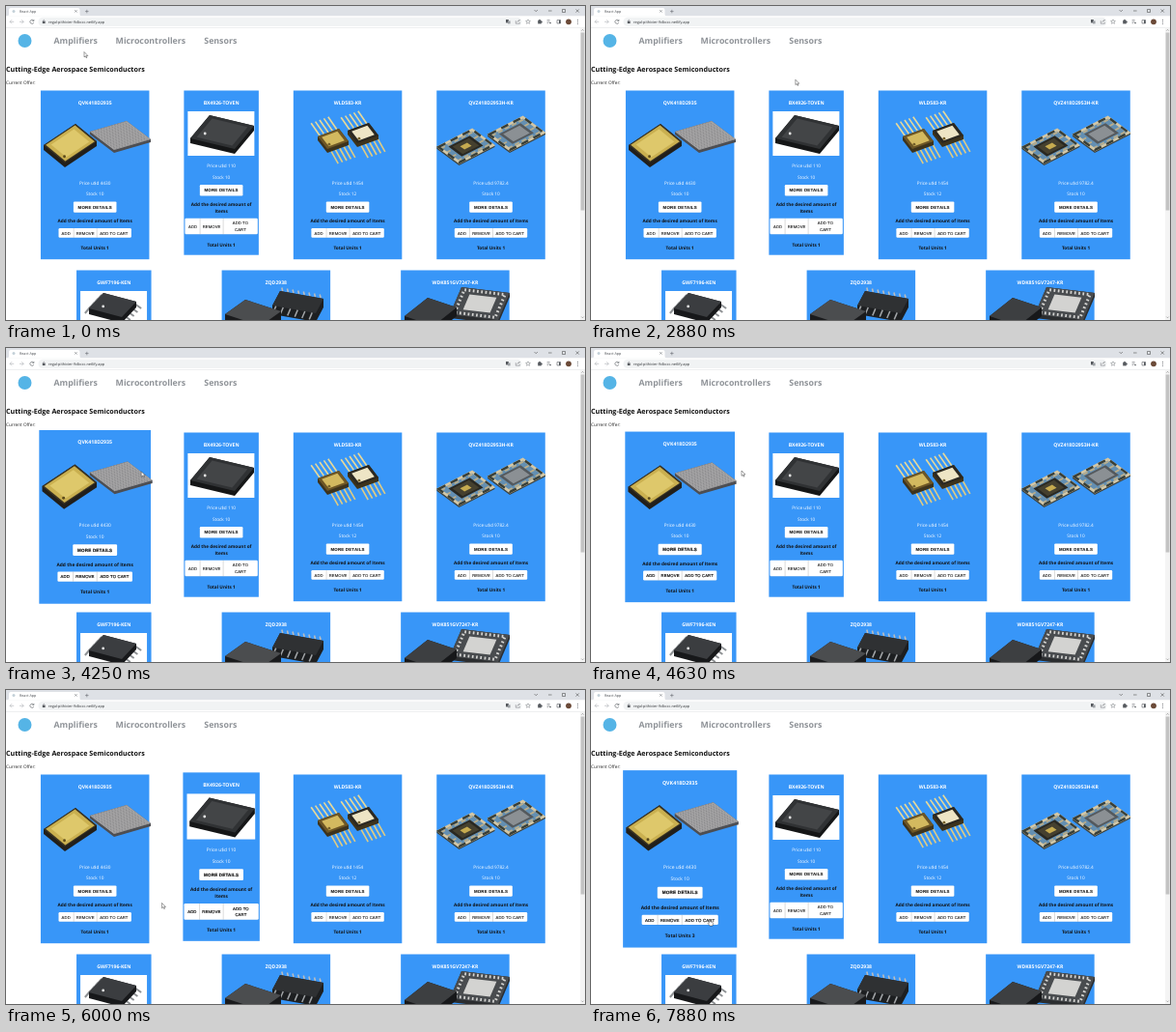
An HTML page that plays this animation: 600 by 325 pixels, repeating every 8000 ms.

```html
<!DOCTYPE html>
<html lang="en">
<head>
<meta charset="utf-8">
<title>React App</title>
<style>
html, body { margin: 0; width: 100%; height: 100%; overflow: hidden; background: #fff; }
svg { display: block; width: 600px; height: 325px; }
text { font-family: "Open Sans", "Noto Sans", sans-serif; text-rendering: geometricPrecision; white-space: pre; }
.b { font-weight: 700; }
.m { text-anchor: middle; }
.u { font-family: "Liberation Sans", Arial, sans-serif; letter-spacing: .1px; stroke: #111; stroke-width: .07px; }
.hover .u { stroke-width: .16px; }
</style>
</head>
<body>
<svg id="stage" viewBox="0 0 600 325" xmlns="http://www.w3.org/2000/svg"></svg>
<script>
const LOOP = 8000, STEP = 125, GROW = 250, ZOOM = 1.05;
const BLUE = '#3896f8', INK = '#55595e';

const rect = (x, y, w, h, fill, more = '') => `<rect x="${x}" y="${y}" width="${w}" height="${h}" fill="${fill}" ${more}/>`;
const dot = (x, y, r, fill) => `<circle cx="${x}" cy="${y}" r="${r}" fill="${fill}"/>`;
const line = (d, color, w, more = '') => `<path d="${d}" fill="none" stroke="${color}" stroke-width="${w}" ${more}/>`;
const text = (x, y, s, size, fill, cls = '', more = '') =>
  `<text x="${x}" y="${y}" font-size="${size}" fill="${fill}" class="${cls}" ${more}>${s}</text>`;
const times = (n, f) => Array.from({ length: n }, (_, i) => f(i)).join('');

// Chips are parallelograms: corner o, edges a and b
const at = ([o, a, b], u, v) => [o[0] + a[0] * u + b[0] * v, o[1] + a[1] * u + b[1] * v];
const ring = (q, m) => [[m, m], [1 - m, m], [1 - m, 1 - m], [m, 1 - m]].map(c => at(q, ...c)).join(' ');
const face = (q, m, fill, more = '') => `<polygon points="${ring(q, m)}" fill="${fill}" ${more}/>`;
const trim = (q, m, color, w, dash) => face(q, m, 'none', `stroke="${color}" stroke-width="${w}" stroke-dasharray="${dash}"`);
const stripes = (q, n, color, w, dash) => times(n, i =>
  line(`M${at(q, .03, (i + .5) / n)}L${at(q, .97, (i + .5) / n)}`, color, w, `stroke-dasharray="${dash}"`));
const pins = (q, n, v, dx, dy, color, w) => times(n, i => line(`M${at(q, (i + .5) / n, v)}l${dx} ${dy}`, color, w));
const mark = (q, u, v, fill) => dot(...at(q, u, v), 1.4, fill);

function slab(q, h, top, side) {
  const down = ([x, y]) => [x, y + h];
  const [p0, p1, p2, p3] = [at(q, 0, 0), at(q, 1, 0), at(q, 1, 1), at(q, 0, 1)];
  const hull = [p0, p1, p2, down(p2), down(p3), down(p0)].join(' ');
  return `<polygon points="${hull}" fill="${side}"/>` + face(q, 0, top);
}

function goldPic() {
  const balls = [[87, 130], [38, -11], [25, 19]], chip = [[39, 144], [33, -22], [22, 18]];
  return slab(balls, 3, '#a9a8a9', '#4d4e52') + stripes(balls, 17, '#68686b', .6, '.8 .8')
    + slab(chip, 5, '#3a3323', '#211f1b') + face(chip, .04, '#cab050') + face(chip, .14, '#dec86b')
    + mark(chip, .12, .8, '#5c4a1b');
}
function bgaPic(x, y) {
  const chip = [[191, 137], [20, -24], [46, 11]];
  return rect(x + 4, y + 21.5, 69, 46, '#fff') + slab(chip, 5, '#303234', '#151617')
    + face(chip, .1, '#434547') + mark(chip, .3, .2, '#e6e6e6');
}
function leadPic() {
  const one = (x, y, lid, core) => {
    const q = [[x, y], [22, -8], [10, 13]];
    return pins(q, 5, 0, -9, -13, '#e8d998', 1.6) + pins(q, 5, 1, 9, 16, '#dfcc83', 1.6)
      + slab(q, 4, lid, '#3d331c') + face(q, .13, core) + mark(q, .2, .75, '#75602a');
  };
  return one(354, 129, '#2b2821', '#eee5c5') + one(323, 135, '#6d5626', '#d3b95f');
}
function framePic() {
  const one = (x, y, rim, die) => {
    const q = [[x, y], [37, -19], [23, 17]];
    return slab(q, 2, '#638fb2', '#3f443f') + stripes(q, 4, '#b9ad8b', 1.8, '5 3')
      + trim(q, .03, '#d3c7a6', 2.6, 'none') + trim(q, .03, '#383e37', 2.4, '8 6')
      + face(q, .2, rim) + face(q, .27, die);
  };
  const left = [446.5, 146];
  return one(499, 133, '#54595d', '#8b9094') + one(...left, '#292822', '#45402f')
    + face([left, [37, -19], [23, 17]], .4, '#c6ab50');
}
function soicPic(x, y) {
  const chip = [[86, 313], [15, -16], [34, 9]];
  return rect(x + 4, y + 21.5, 69, 32, '#fff') + pins(chip, 4, 0, -6, 7, '#8d9093', 2)
    + pins(chip, 4, 1, 7, 5, '#8d9093', 2) + slab(chip, 6, '#3b3d40', '#17181a') + mark(chip, .3, .3, '#e4e4e4');
}
function quadPic() {
  const back = [[276, 310], [8, -15], [45, 8]], front = [[227, 319], [21, -15], [37, 12]];
  const edge = [at(back, 1, 0), back[2], [0, 0]], near = [back[0], back[2], [0, 0]];
  return pins(edge, 8, 0, -1, -4, '#b9bcbf', 1.5) + slab(back, 9, '#2f3133', '#1d1f21')
    + pins(near, 6, 0, -3, 7, '#a2a5a8', 1.5) + slab(front, 9, '#4b4d4f', '#1a1b1d');
}
function qfnPic() {
  const pads = [[460, 319], [12, -28], [50, 6]], front = [[413, 321], [24, -19], [30, 10]];
  return slab(pads, 4, '#494c4f', '#2b2d2f') + trim(pads, .08, '#d4d4d2', 3, '1.7 2.6')
    + face(pads, .22, '#d3d3d1') + slab(front, 9, '#3d3f41', '#17181a');
}

const cards = [];
function row(y, h, ...items) {
  const room = 594.7 - items.reduce((s, i) => s + i.w, 0);
  const gap = room / (items.length + 1);
  let x = gap;
  return items.map(i => {
    const c = { id: i.pic.name, x, y, h, ...i };
    cards.push(c);
    x += i.w + gap;
    return cardSvg(c);
  }).join('');
}

const pill = (x, y, w, h) => rect(x, y + .3, w, h, '#2a72c0', 'rx="1.3" opacity=".35"') + rect(x, y, w, h, '#fff', 'rx="1.2"');

function cardSvg({ id, x, y, w, h, name, pic, price, stock }) {
  const c = x + w / 2, wide = w > 100, o = wide ? 0 : -17.4;
  const mid = (dy, s, cls = 'b m', fill = '#111') => text(c, y + dy, s, 4.72, fill, cls);
  const btn = (dx, dy, s) => text(c + dx, y + dy, s, 4.2, '#111', 'u m');
  const bar = bh => pill(c - 37.7, y + (wide ? 142.5 : 132.3), 75.4, bh)
    + line(`M${c - 22} ${y + (wide ? 142.5 : 132.3)}v${bh}m24 0v${-bh}`, '#999', .35);
  let out = rect(x, y, w, h, BLUE) + text(c, y + 14.1, name, 5.1, '#fff', 'b m') + pic(x, y);
  if (price) {
    out += mid(97.1 + o, 'Price u$d ' + price, 'm', '#fff') + mid(108.5 + o, 'Stock ' + stock, 'm', '#fff')
      + pill(c - 22.3, y + 114.9 + o, 44.6, 11.4)
      + text(c, y + 122.2 + o, 'MORE DETAILS', 4.4, '#111', 'u b m', 'style="letter-spacing:.2px"')
      + (wide
        ? mid(136.6, 'Add the desired amount of Items') + bar(9.8)
          + btn(-30, 149, 'ADD') + btn(-10, 149, 'REMOVE') + btn(19.7, 149, 'ADD TO CART')
        : mid(119.2, 'Add the desired amount of') + mid(126.1, 'Items') + bar(16.4)
          + btn(-29.5, 142, 'ADD') + btn(-10, 142, 'REMOVE') + btn(19.8, 138.8, 'ADD TO') + btn(19.8, 145.4, 'CART'))
      + `<g id="${id}Units">${mid(wide ? 164.6 : 161, 'Total Units 1')}</g>`;
  }
  return `<g id="${id}">${out}</g>`;
}

function browser() {
  const pale = '#a9adb0';
  return rect(0, 0, 600, 10.5, '#dee1e6')
    + '<path d="M1 10.5Q3 10.5 3 8.5V4Q3 2 5 2H74.5Q76.5 2 76.5 4V8.5Q76.5 10.5 78.5 10.5Z" fill="#fff"/>'
    + dot(8, 5.6, 1.5, '#c3d0d8') + text(14, 7, 'React App', 3.7, '#45494d')
    + line('M71.2 4.2l2.4 2.4m0-2.4l-2.4 2.4M82 5.6h3.6M83.8 3.8v3.6', INK, .5)
    + line('M547.5 4l1.7 1.7 1.7-1.7M562 5h3.6M576.5 3.5h3v3h-3zM590.6 3.4l3.2 3.2m0-3.2l-3.2 3.2', '#333', .5)
    + rect(0, 10.5, 600, 12, '#fff') + rect(33.5, 11.7, 501, 9.3, '#f1f3f4', 'rx="4.6"')
    + line('M8.2 16.3H4m2-2l-2 2 2 2M14 16.3h4.2m-2-2l2 2-2 2', pale, .6)
    + line('M28.6 15.2a2 2 0 1 0 .2 1.8M28.9 13.9v1.6h-1.6', INK, .6)
    + rect(37.8, 15.8, 2.8, 2.3, INK) + line('M38.4 16v-1q.8-1.4 1.6 0v1', INK, .45)
    + text(44, 17.8, 'regal-pithivier-9dbccc.netlify.app', 3.85, '#303336')
    + rect(518, 14, 2.8, 3.4, INK) + rect(520, 15.4, 2.6, 3, '#9b9fa3')
    + line('M528.3 15.2v3h4v-1.4M529.8 16.8q.4-2 2.6-2l-.8-.9m.8.9l-.8.8', INK, .45)
    + line('M541 13.8l.7 1.6 1.7.1-1.3 1.1.4 1.7-1.5-.9-1.5.9.4-1.7-1.3-1.1 1.7-.1z', INK, .4)
    + rect(551.2, 14.8, 3.6, 3.6, INK) + dot(553, 14.5, .8, INK) + dot(555.1, 16.6, .8, INK)
    + line('M560.6 14.6h3M560.6 16.2h3M560.6 17.8h1.6', INK, .5) + dot(564, 17.6, .8, INK)
    + line('M571 14.6h3.6v3.4H571z', INK, .6) + rect(573, 14.6, 1.6, 3.4, INK)
    + dot(583, 16.3, 2.9, '#6b4a38')
    + times(3, i => dot(592.5, 14.4 + 1.9 * i, .5, INK))
    + rect(0, 22, 600, .5, '#dcdee1')
    + rect(595, 22.5, 5, 302.5, '#f4f4f4') + rect(595.6, 27.5, 3.8, 184, '#c3c3c3')
    + line('M596.3 25.6l1.2-1.2 1.2 1.2M596.3 321.6l1.2 1.2 1.2-1.2', '#777', .6);
}

function page() {
  const nav = (x, s) => text(x, 38.6, s, 8.8, '#8f9398', 'b');
  const wide = 112.5, slim = 77.5;
  return rect(0, 0, 600, 325, '#fff') + dot(19.5, 36, 7, '#55b4e6')
    + nav(49.5, 'Amplifiers') + nav(113.6, 'Microcontrollers') + nav(205.3, 'Sensors')
    + text(0, 67.7, 'Cutting-Edge Aerospace Semiconductors', 7.16, '#111', 'b')
    + text(0, 81, 'Current Offer:', 4.7, '#222')
    + row(87.5, 174.7,
      { w: wide, name: 'QVK418D2935', pic: goldPic, price: '4430', stock: 10 },
      { w: slim, h: 170.2, name: 'BX4926-TOVEN', pic: bgaPic, price: '110', stock: 10 },
      { w: wide, name: 'WLD583-KR', pic: leadPic, price: '1454', stock: 12 },
      { w: wide, name: 'QVZ418D2953H-KR', pic: framePic, price: '9782.4', stock: 10 })
    + row(273.5, 60,
      { w: slim, name: 'GWF7196-KEN', pic: soicPic },
      { w: wide, name: 'ZQD2938', pic: quadPic },
      { w: wide, name: 'WDK851GV7247-KR', pic: qfnPic });
}

const shapes = {
  arrow: 'M0 0V5.4L1.3 4.3 2.2 6.2 3 5.8 2.2 4H3.9Z',
  beam: 'M-1 -2.6H1M0 -2.6V2.6M-1 2.6H1',
  hand: 'M-.6 .3Q0 -.5 .6 .3V2.4L3 2.9Q3.8 3.2 3.6 4.2L3 6.6H.1L-1.9 4Q-1.9 3 -.6 3.8Z'
};

const $ = id => document.getElementById(id);
$('stage').innerHTML = page() + browser() + '<path id="pointer" fill="#fff" stroke="#111" stroke-width=".4"/>';

// Pointer stops: time, x, y
const stops = [
  [0, 81, 47.5], [1125, 104.5, 65.5], [1700, 70, 66], [2600, 150, 73], [3200, 285, 80],
  [3550, 269, 136], [3750, 254.5, 141.3], [4150, 136, 128], [4625, 156, 127], [5100, 110, 178],
  [5625, 191.5, 210], [5800, 198, 214], [6500, 70.5, 236.5], [6750, 62, 237], [7200, 62, 237], [7875, 123, 237.5]
];
const clicks = [6800, 7100];

function tip(t) {
  const i = stops.findIndex(s => s[0] > t);
  if (i < 1) return (i ? stops[stops.length - 1] : stops[0]).slice(1);
  const [a, b] = [stops[i - 1], stops[i]], k = (t - a[0]) / (b[0] - a[0]);
  return [a[1] + (b[1] - a[1]) * k, a[2] + (b[2] - a[2]) * k];
}

// Share of the last GROW ms spent over the card, eased
function hover(c, t) {
  const n = 20;
  let k = 0;
  for (let i = 0; i < n; i++) {
    const [x, y] = tip(t - GROW * (i + .5) / n);
    if (x > c.x && x < c.x + c.w && y > c.y && y < c.y + c.h) k += 1 / n;
  }
  return k * k * (3 - 2 * k);
}

function draw(t) {
  for (const c of cards) {
    const k = hover(c, t), x = c.x + c.w / 2, y = c.y + c.h / 2;
    $(c.id).setAttribute('transform', `translate(${x} ${y}) scale(${1 + (ZOOM - 1) * k}) translate(${-x} ${-y})`);
    $(c.id).setAttribute('class', k > .01 ? 'hover' : '');
  }
  $('goldPicUnits').firstChild.textContent = 'Total Units ' + (1 + clicks.filter(c => t >= c).length);

  const [x, y] = tip(t);
  const kind = t >= 6300 ? 'hand' : x < 144 && y > 61 && y < 70 ? 'beam' : 'arrow';
  $('pointer').setAttribute('d', shapes[kind]);
  $('pointer').setAttribute('transform', `translate(${x} ${y})`);
}

const start = performance.now();
function tick() {
  const t = (performance.now() - start) % LOOP;
  draw(Math.floor(t / STEP) * STEP);
  requestAnimationFrame(tick);
}
tick();
</script>
</body>
</html>
```
